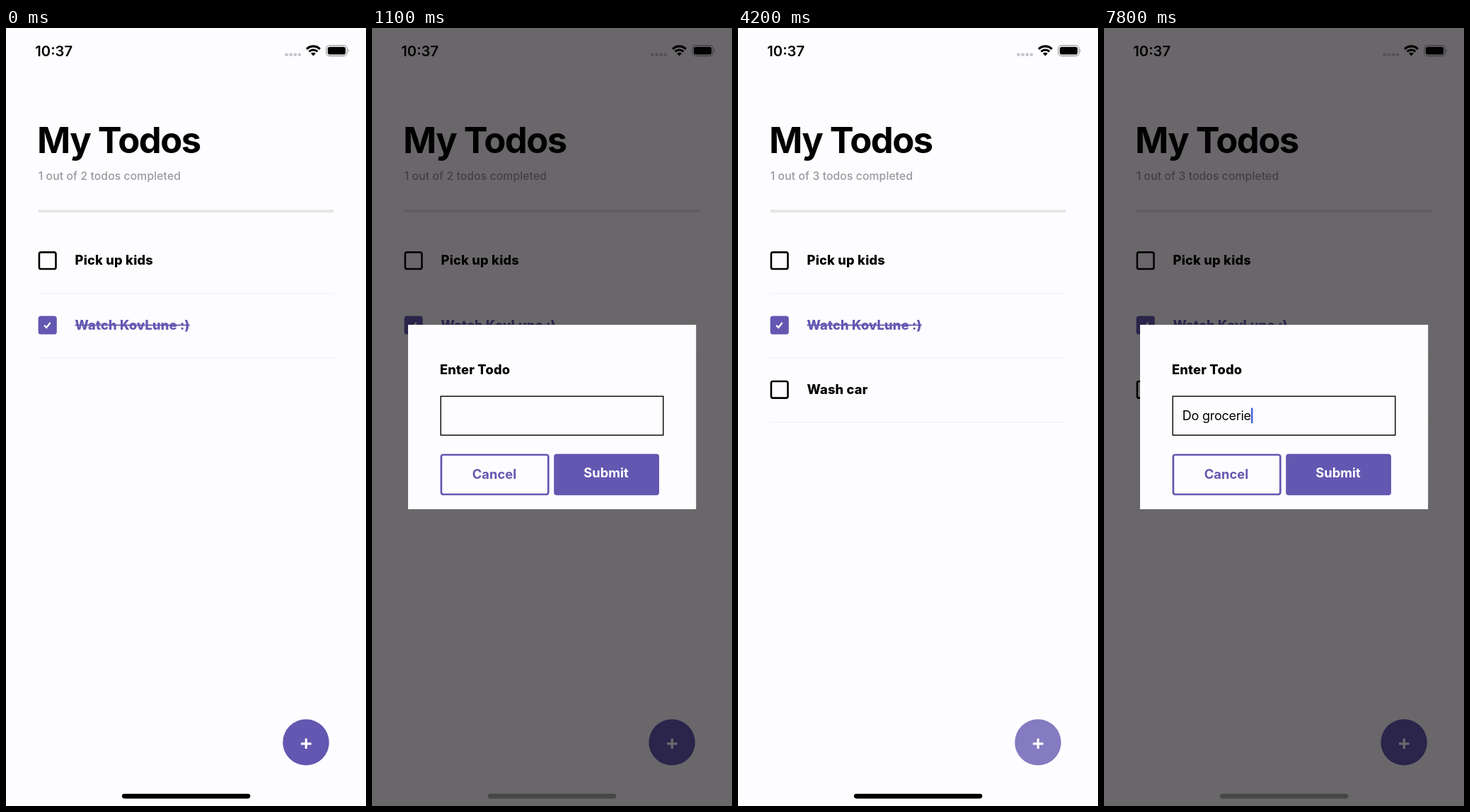
Animation of 509x1101 px, one loop 8 s. Source, as an HTML page:

```html
<!DOCTYPE html>
<html lang="en">
<head>
<meta charset="utf-8">
<title>My Todos</title>
<style>
  html, body { margin: 0; width: 100%; height: 100%; overflow: hidden; background: #fdfcfe; }
  svg { display: block; width: 100%; height: 100%; }
  text { font-family: Inter, Roboto, sans-serif; font-size: 18.3px; font-weight: 700; font-optical-sizing: none; white-space: pre; }
  .clock { font-size: 20.2px; font-weight: 600; }
  .title { font-size: 50.8px; letter-spacing: -1.55px; }
  .count { font-size: 15.7px; font-weight: 500; letter-spacing: .11px; fill: #9b999d; }
  .item { font-weight: 800; letter-spacing: .18px; }
  .done { fill: #6357b1; text-decoration: line-through; text-decoration-thickness: 1.6px; }
  .button { letter-spacing: .06px; text-anchor: middle; }
  .entry { font-size: 18px; font-weight: 400; letter-spacing: -.25px; }
  .box { fill: none; stroke: #000; stroke-width: 2.6; }
  .rule { fill: #f0eff1; }
  .purple { fill: #6357b1; }
</style>
</head>
<body>
<svg viewBox="0 0 509 1101">
  <rect width="509" height="1101" fill="#fdfcfe"/>

  <text class="clock" x="41.3" y="39.6">10:37</text>
  <g fill="#c6c5c9">
    <rect x="394.4" y="35.4" width="4.4" height="4.4" rx="1.6"/>
    <rect x="400.5" y="35.4" width="4.4" height="4.4" rx="1.6"/>
    <rect x="406.6" y="35.4" width="4.4" height="4.4" rx="1.6"/>
    <rect x="412.7" y="35.4" width="4.4" height="4.4" rx="1.6"/>
  </g>
  <g fill="none" stroke="#000" stroke-width="3.1">
    <path d="M425.1 29.8A13.3 13.3 0 0 1 443.9 29.8"/>
    <path d="M428.6 33.4A8.4 8.4 0 0 1 440.4 33.4"/>
  </g>
  <path d="M434.5 39.6L431.1 36.1A4.8 4.8 0 0 1 437.9 36.1Z"/>
  <rect x="452.9" y="24.7" width="29.2" height="14.8" rx="4.6" fill="none" stroke="#9d9ca0" stroke-width="1.3"/>
  <rect x="454.9" y="26.7" width="25.2" height="10.8" rx="2.8"/>
  <path d="M483.5 29.6A3.6 3.6 0 0 1 483.5 34.6Z" fill="#9d9ca0"/>

  <text class="title" x="44" y="176.6">My Todos</text>
  <text class="count" id="count" x="45.7" y="214.8"></text>
  <rect x="45.7" y="257.2" width="417.7" height="4" fill="#e7e5e7"/>

  <g>
    <rect class="box" x="46.9" y="317.4" width="23.6" height="23.6" rx="2.6"/>
    <text class="item" x="97.6" y="335.2">Pick up kids</text>
    <rect class="rule" x="45.7" y="375" width="417.7" height="1.2"/>
  </g>
  <g>
    <rect class="purple" x="45.6" y="407.4" width="26.2" height="26.2" rx="3.9"/>
    <path d="M54 420.7L57.2 423.9L62.6 417" fill="none" stroke="#fff" stroke-width="2.3"/>
    <text class="item done" x="97.6" y="426.5">Watch KovLune :)</text>
    <rect class="rule" x="45.7" y="466.2" width="417.7" height="1.2"/>
  </g>
  <g id="added">
    <rect class="box" x="46.9" y="500" width="23.6" height="23.6" rx="2.6"/>
    <text class="item" x="97.6" y="517.8">Wash car</text>
    <rect class="rule" x="45.7" y="557.5" width="417.7" height="1.2"/>
  </g>

  <g id="add">
    <circle class="purple" cx="424.1" cy="1010.9" r="32.7"/>
    <path d="M417 1012.8H431.6M424.3 1005.6V1020" stroke="#fff" stroke-width="3.2"/>
  </g>

  <g id="modal">
    <rect width="509" height="1101" fill="#040104" opacity=".588"/>
    <rect x="51" y="420" width="407.2" height="261" fill="#fdfcfe"/>
    <text class="item" x="96" y="489.6">Enter Todo</text>
    <rect x="97.2" y="521.2" width="314.6" height="55" fill="none" stroke="#000" stroke-width="1.4"/>
    <text class="entry" id="entry" x="110.8" y="555"></text>
    <rect id="caret" y="537.4" width="2.6" height="22.2" rx="1.2" fill="#4564dc"/>
    <rect x="97.9" y="604" width="151.4" height="56" rx="2.8" fill="none" stroke="#6357b1" stroke-width="2.7"/>
    <text class="button purple" x="173" y="638.2">Cancel</text>
    <g id="submit">
      <rect class="purple" x="257.2" y="602.7" width="148.8" height="58.6" rx="4"/>
      <text class="button" x="331" y="635.8" fill="#fff">Submit</text>
    </g>
  </g>

  <rect id="home" x="164" y="1083.8" width="181.4" height="6.6" rx="3.3"/>
</svg>
<script>
const LOOP = 8000, STEP = 100;
const byId = id => document.getElementById(id);
const [count, added, add, modal, entry, caret, submit, home] =
  ['count', 'added', 'add', 'modal', 'entry', 'caret', 'submit', 'home'].map(byId);

// Each table holds [time in ms, value].
const modalFade = [[500, 0], [600, .35], [700, .76], [800, .95], [900, 1],
  [3300, 1], [3400, .8], [3500, .4], [3600, .1], [3700, 0],
  [4200, 0], [4300, .55], [4400, .885], [4500, .98], [4600, 1]];
const addFade = [[400, 1], [500, .65], [600, .88], [700, 1],
  [4000, 1], [4100, .6], [4200, .78], [4300, .95], [4400, 1]];
const submitFade = [[3100, 1], [3200, .6], [3300, .8], [3400, 1]];
const homeGrey = [[600, 0], [700, 26], [800, 42], [1100, 70],
  [3300, 70], [3700, 0], [4200, 0], [4400, 42], [4800, 70]];
const typed = [[0, ''],
  [2100, 'W'], [2200, 'Wa'], [2300, 'Wash'], [2400, 'Wash '], [2500, 'Wash c'],
  [2600, 'Wash ca'], [2700, 'Wash car'], [3700, ''],
  [5500, 'D'], [5700, 'Do'], [5900, 'Do '], [6200, 'Do go'], [6300, 'Do gorc'],
  [6500, 'Do gor'], [6600, 'Do go'], [6700, 'Do g'], [6800, 'Do '],
  [7000, 'Do g'], [7100, 'Do gr'], [7200, 'Do gro'], [7300, 'Do groc'],
  [7600, 'Do groce'], [7700, 'Do groceri'], [7800, 'Do grocerie']];

const held = (table, t) => table.filter(([at]) => at <= t).pop()[1];

function mix(table, t) {
  const next = table.findIndex(([at]) => at > t);
  if (next === 0) return table[0][1];
  if (next < 0) return table[table.length - 1][1];
  const [t0, a] = table[next - 1], [t1, b] = table[next];
  return a + (b - a) * (t - t0) / (t1 - t0);
}

const fade = (el, value) => el.setAttribute('opacity', value);

function draw(t) {
  const saved = t >= 3300;
  const focused = (t >= 1500 && t < 3700) || t >= 5300;
  count.textContent = `1 out of ${saved ? 3 : 2} todos completed`;
  fade(added, saved ? 1 : 0);
  fade(add, mix(addFade, t));
  fade(submit, mix(submitFade, t));
  fade(modal, mix(modalFade, t));
  fade(caret, focused ? 1 : 0);

  const text = held(typed, t);
  entry.textContent = text;
  caret.setAttribute('x', 110.9 + (text ? entry.getComputedTextLength() : 0));

  const g = Math.round(mix(homeGrey, t));
  home.setAttribute('fill', `rgb(${g},${g},${g})`);
}

const start = performance.now();
function tick(now) {
  const t = Math.max(0, now - start) % LOOP;
  draw(Math.floor(t / STEP) * STEP);
  requestAnimationFrame(tick);
}
draw(0);
requestAnimationFrame(tick);
</script>
</body>
</html>
```
